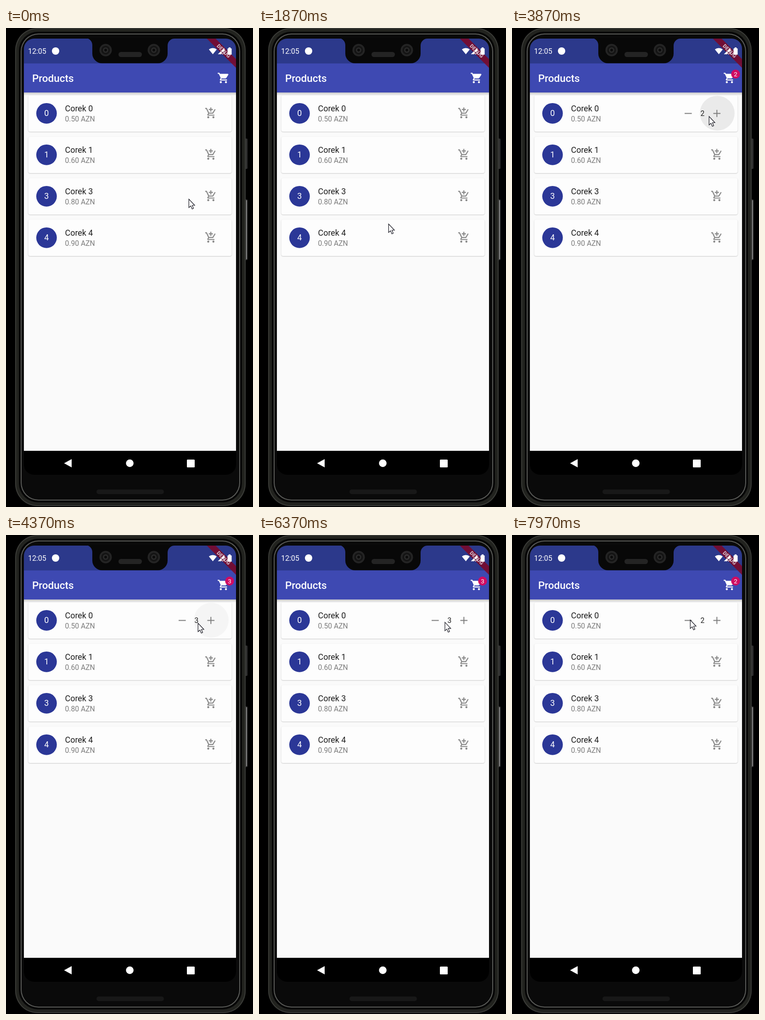
An HTML page with a canvas for the animation above (8 s loop, 538x1040 px).

```html
<!DOCTYPE html>
<html lang="en">
<head>
<meta charset="utf-8">
<title>Products</title>
<style>
html, body { margin: 0; width: 100%; height: 100%; overflow: hidden; background: #000; }
canvas { display: block; }
</style>
</head>
<body>
<canvas id="stage" width="538" height="1040"></canvas>
<script>
const ctx = document.getElementById('stage').getContext('2d');
const LOOP = 8000;
const DP = 1.122;   // pixels per layout unit
const ROW = 90;
const left = 39, right = 501;
const ids = [0, 1, 3, 4];

// pointer stops; each hop ends at its time and lasts HOP at most
const HOP = 1000;
const stops = [
  { at: 0, x: 398, y: 371 },
  { at: 1870, x: 282, y: 425 },
  { at: 3170, x: 440, y: 192 },
  { at: 4370, x: 418, y: 191 },
  { at: 5440, x: 393, y: 190 },
  { at: 6970, x: 426, y: 187 },
  { at: 7150, x: 388, y: 184 }
];

const burst = (from, gap, n, step) =>
  Array.from({ length: n }, (_, i) => ({ at: from + gap * i, step }));
const taps = [...burst(3350, 310, 3, 1), ...burst(6580, 220, 2, 1), ...burst(7150, 150, 3, -1)];

const clamp = v => Math.max(0, Math.min(1, v));
const smooth = v => v * v * (3 - 2 * v);

function rect(x, y, w, h, fill) {
  ctx.fillStyle = fill;
  ctx.fillRect(x, y, w, h);
}

function box(x, y, w, h, r, fill) {
  ctx.beginPath();
  ctx.roundRect(x, y, w, h, r);
  ctx.fillStyle = fill;
  ctx.fill();
}

function disc(x, y, r, fill) {
  ctx.beginPath();
  ctx.arc(x, y, r, 0, Math.PI * 2);
  ctx.fillStyle = fill;
  ctx.fill();
}

function trace(points) {
  ctx.beginPath();
  points.forEach(([x, y]) => ctx.lineTo(x, y));
}

function shape(points, fill) {
  trace(points);
  ctx.closePath();
  ctx.fillStyle = fill;
  ctx.fill();
}

function line(points, color, width = 2) {
  trace(points);
  ctx.strokeStyle = color;
  ctx.lineWidth = width;
  ctx.stroke();
}

function text(str, x, y, size, color, align = 'left', weight = 400) {
  ctx.font = `${weight} ${size}px Roboto, sans-serif`;
  ctx.textAlign = align;
  ctx.fillStyle = color;
  ctx.fillText(str, x, y);
}

function shell(inset, fill) {
  box(20 + inset, inset, 502 - 2 * inset, 1038 - 2 * inset, 48 - inset * 0.8, fill);
}

function body() {
  rect(0, 0, 538, 1040, '#000');
  box(518, 240, 8, 66, 2, '#303030');
  box(518, 372, 8, 132, 2, '#303030');
  rect(523, 374, 2, 128, '#858585');
  shell(0, '#3a3b37');
  shell(2, '#22231f');
  shell(8, '#060606');
  shell(12, '#5a5b58');
  shell(14, '#0a0a0a');
  box(197, 1002, 147, 10, 5, '#181818');
}

function camera(x) {
  disc(x, 48, 13.5, '#242424');
  disc(x, 48, 9.5, '#141414');
  disc(x, 48, 6, '#292929');
  disc(x, 48, 3, '#0c0c0c');
}

function notch() {
  const l = 188, r = 352, top = 23, low = 76.5;
  ctx.beginPath();
  ctx.moveTo(l - 16, top - 1);
  ctx.arcTo(l, top, l, low, 15);
  ctx.arcTo(l, low, r, low, 21);
  ctx.arcTo(r, low, r, top, 21);
  ctx.arcTo(r, top, r + 16, top, 15);
  ctx.lineTo(r + 16, top - 1);
  ctx.fillStyle = '#080808';
  ctx.fill();
  camera(217);
  camera(322);
  box(245, 52, 51, 11, 5.5, '#242424');
}

function banner() {
  ctx.save();
  ctx.translate(right, 23);
  ctx.rotate(Math.PI / 4);
  rect(-46, 28 * DP, 92, 12 * DP, 'rgba(125, 8, 38, 0.85)');
  text('DEBUG', 0, 42, 10.2 * DP, '#cdb6c3', 'center', 900);
  ctx.restore();
}

function statusIcons() {
  text('12:05', 48, 56, 16, '#fff');
  disc(108, 50, 8, '#fff');
  ctx.beginPath();
  ctx.moveTo(450.5, 57);
  ctx.arc(450.5, 57, 13.5, -Math.PI * 0.72, -Math.PI * 0.28);
  ctx.fillStyle = '#fff';
  ctx.fill();
  shape([[475.5, 43], [475.5, 57], [461.5, 57]], '#fff');
  line([[469, 51], [475, 57]], '#6b1c43', 1.3);
  line([[475, 51], [469, 57]], '#6b1c43', 1.3);
  box(482.5, 44, 9, 14, 1.5, '#fff');
  rect(485, 42, 4, 3, '#fff');
}

function cart(x, y, color, full) {
  ctx.save();
  ctx.translate(x, y);
  ctx.scale(DP, DP);
  if (full) {
    shape([[4.3, 4], [21, 4], [21.9, 5.3], [17.3, 12.4], [16, 13], [7.5, 13]], color);
    line([[1, 3], [3.7, 3], [8, 12]], color);
  } else {
    line([[1, 3], [3.6, 3], [7.9, 12], [15.9, 12], [20.4, 4.6]], color);
    plus(12, 5, 4, color);
  }
  line([[8, 12], [6.1, 15.4], [7, 16], [19, 16]], color);
  disc(7, 20, 2, color);
  disc(17, 20, 2, color);
  ctx.restore();
}

function minus(x, y, r, color) {
  line([[x - r, y], [x + r, y]], color);
}

function plus(x, y, r, color) {
  minus(x, y, r, color);
  line([[x, y - r], [x, y + r]], color);
}

function header(count) {
  rect(left, 23, 462, 54, '#2c398b');
  rect(left, 77, 462, 63, '#3e49b2');
  text('Products', 57, 117, 20 * DP, '#fff', 'left', 500);
  cart(460, 95, '#fff', true);
  if (count) {
    disc(487, 100, 9.7, '#d00b62');
    text(count, 487, 104.7, 13.5, '#fff', 'center');
  }
}

function ripples(t) {
  // the first tap swaps the button, so it leaves no ripple
  for (const { at, step } of taps.slice(1)) {
    const age = t - at;
    if (age < 0 || age > 500) continue;
    const r = 38 * (0.3 + 0.7 * smooth(clamp(age / 220)));
    const alpha = 0.075 * clamp(age / 60) * clamp((500 - age) / 250);
    disc(step > 0 ? 447 : 384, 185, r, `rgba(0, 0, 0, ${alpha})`);
  }
}

function stepper(count, t) {
  const gray = '#7d7d7d';
  ripples(t);
  minus(383.8, 185.5, 7.8, gray);
  plus(446.3, 185.5, 7.8, gray);
  text(count, 415, 191, 14 * DP, '#222', 'center');
}

function card(id, i, count, t) {
  ctx.save();
  ctx.translate(0, ROW * i);
  ctx.shadowColor = 'rgba(0, 0, 0, 0.24)';
  ctx.shadowBlur = 2;
  ctx.shadowOffsetY = 0.8;
  box(48.5, 146, 443, 79, 4, '#fdfdfd');
  ctx.shadowColor = 'transparent';
  disc(88.3, 185.3, 22.4, '#2b3797');
  text(id, 88.3, 191, 16 * DP, '#fff', 'center');
  text('Corek ' + id, 128.5, 181, 16 * DP, '#1f1f1f');
  text((0.5 + id / 10).toFixed(2) + ' AZN', 128.5, 203, 14 * DP, '#7c7c7c');
  if (i === 0 && count) stepper(count, t);
  else cart(432.7, 171.3, '#888', false);
  ctx.restore();
}

function navBar() {
  rect(left, 918, 462, 52, '#000');
  shape([[126.5, 945], [143, 936], [143, 954]], '#fff');
  disc(269.6, 945, 8.3, '#fff');
  box(394, 937, 17, 17, 1.5, '#fff');
}

function screen(t, count) {
  ctx.save();
  ctx.beginPath();
  ctx.roundRect(left, 23, 462, 947, 22);
  ctx.clip();
  rect(left, 140, 462, 778, '#fafafa');
  ids.forEach((id, i) => card(id, i, count, t));
  const shade = ctx.createLinearGradient(0, 140, 0, 147);
  shade.addColorStop(0, 'rgba(0, 0, 0, 0.2)');
  shade.addColorStop(1, 'rgba(0, 0, 0, 0)');
  rect(left, 140, 462, 7, shade);
  header(count);
  banner();
  statusIcons();
  navBar();
  ctx.restore();
}

function cursor(t) {
  let { x, y } = stops[0];
  stops.slice(1).forEach((stop, i) => {
    const hop = Math.min(HOP, stop.at - stops[i].at);
    const k = smooth(clamp((t - stop.at + hop) / hop));
    x += (stop.x - x) * k;
    y += (stop.y - y) * k;
  });
  ctx.save();
  ctx.translate(x, y);
  shape([[0.3, 0.5], [0.3, 19], [4.5, 15.2], [7.4, 22], [10.4, 20.7], [7.6, 14], [13, 14]], '#fff');
  ctx.strokeStyle = '#15151f';
  ctx.lineWidth = 1.2;
  ctx.stroke();
  ctx.restore();
}

function draw(t) {
  const count = taps.reduce((sum, tap) => sum + (t >= tap.at ? tap.step : 0), 0);
  body();
  screen(t, count);
  notch();
  cursor(t);
}

const start = performance.now();
function tick() {
  draw((performance.now() - start) % LOOP);
  requestAnimationFrame(tick);
}
tick();
</script>
</body>
</html>
```
